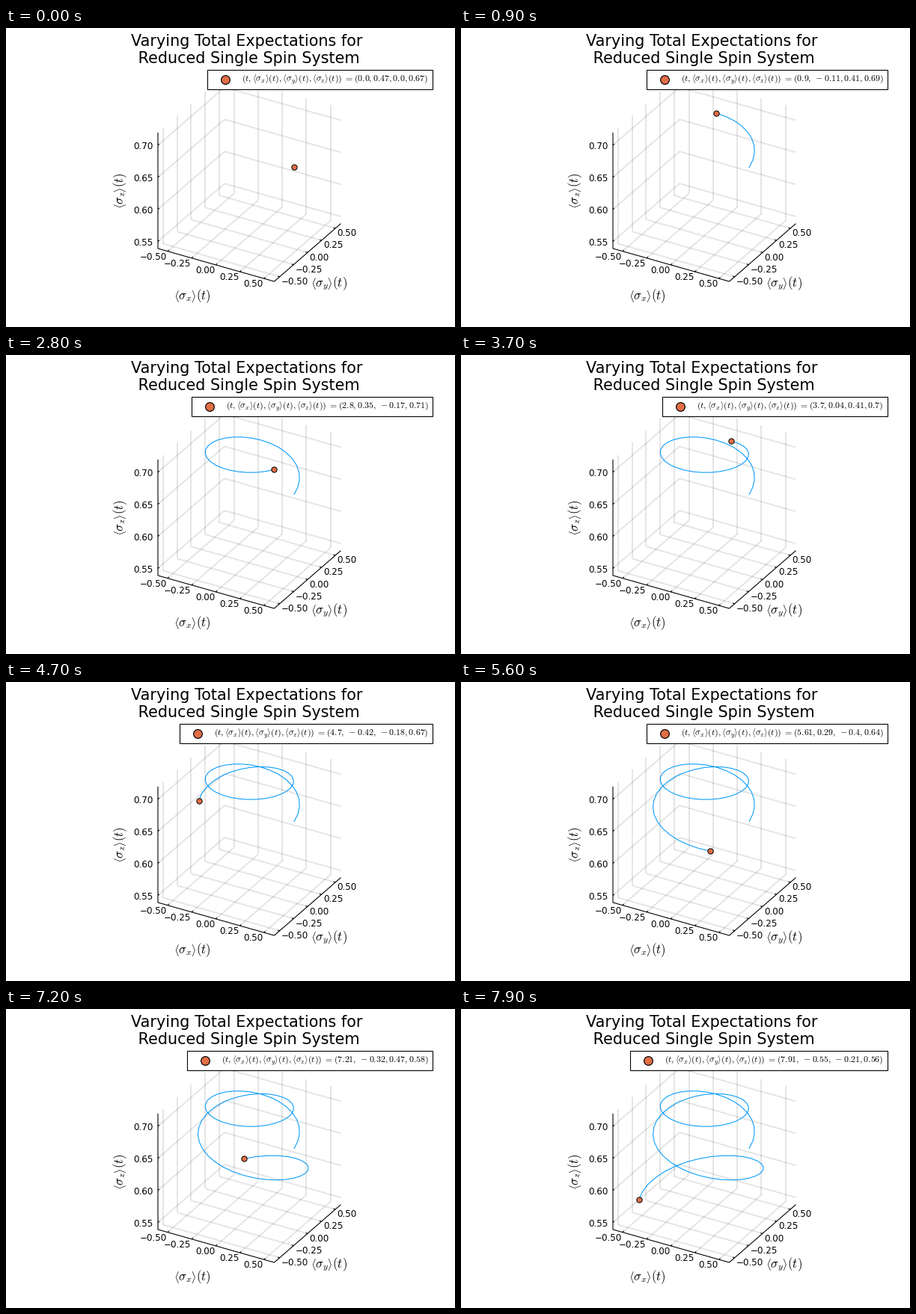
Recreate the animation shown at these times as a matplotlib script. Size 600x400 px, loop 8000 ms.

```python
import matplotlib.pyplot as plt
import numpy as np
from matplotlib.animation import FuncAnimation
from matplotlib.patches import Rectangle

plt.rcParams["font.family"] = "DejaVu Sans"
plt.rcParams["mathtext.fontset"] = "cm"

PT = 0.72  # points per pixel at 100 dpi
FRAMES = 80
ORANGE, BLUE = "#E26F46", "#009AFA"

fig = plt.figure(figsize=(6, 4), dpi=100, facecolor="white")
ax = fig.add_axes([0, 0, 1, 1])
ax.set_xlim(0, 600)
ax.set_ylim(400, 0)
ax.axis("off")

# Data limits of the 3D box
X0, X1 = -0.600, 0.607
Y0, Y1 = -0.598, 0.598
Z0, Z1 = 0.5389, 0.7197
XY_TICKS = np.arange(-2, 3) * 0.25
Z_TICKS = np.arange(4) * 0.05 + 0.55


def project(x, y, z):
    """Orthographic view: data to pixels."""
    u, v, w = x - X0, y - Y0, z - Z0
    return 203 + 128.8 * u + 74.4 * v, 295 + 36.5 * u - 64.7 * v - 858 * w


def line3(points, **style):
    px, py = zip(*(project(*p) for p in points))
    ax.plot(px, py, solid_capstyle="butt", **style)


def label(x, y, text, size=11.9, **kw):
    return ax.text(x, y, text, fontsize=size * PT, color="black", **kw)


def num(v):
    return f"{v:.2f}".replace("-", "\u2212")


def draw_box():
    grid = dict(color="black", alpha=0.1, lw=2 * PT, zorder=1)
    edge = dict(color="black", lw=1.1 * PT, zorder=2)
    for s in XY_TICKS:
        line3([(s, Y0, Z0), (s, Y1, Z0)], **grid)
        line3([(s, Y1, Z0), (s, Y1, Z1)], **grid)
        line3([(X0, s, Z0), (X1, s, Z0)], **grid)
        line3([(X0, s, Z0), (X0, s, Z1)], **grid)
        line3([(s, Y0, Z0), (s, Y0 + 0.025, Z0)], **edge)
        line3([(X1, s, Z0), (X1 - 0.02, s, Z0)], **edge)
        px, py = project(s, Y0, Z0)
        label(px - 0.7, py + 11.1, num(s), ha="right")
        px, py = project(X1, s, Z0)
        label(px + 2.2, py + 10.2, num(s), ha="left")
    for s in Z_TICKS:
        line3([(X0, Y0, s), (X0, Y1, s)], **grid)
        line3([(X0, Y1, s), (X1, Y1, s)], **grid)
        line3([(X0, Y0, s), (X0, Y0 + 0.025, s)], **edge)
        px, py = project(X0, Y0, s)
        label(px - 6.5, py + 5.2, num(s), ha="right")
    line3([(X0, Y0, Z1), (X0, Y0, Z0), (X1, Y0, Z0), (X1, Y1, Z0)], **edge)


def sigma(axis):
    # h and i are the text-size angle brackets of the symbol font
    return rf"\mathcal{{h}}\sigma_{axis}\mathcal{{i}}(t)"


draw_box()
label(322, 24, "Varying Total Expectations for", 20.8, ha="center")
label(321.5, 47, " Reduced Single Spin System", 20.8, ha="center")
label(248.5, 363, f"${sigma('x')}$", 16.8, ha="center")
label(431.5, 346, f"${sigma('y')}$", 16.8, ha="center")
label(153, 218, f"${sigma('z')}$", 16.8, ha="center", va="center", rotation=90)


def spin_path(t):
    """Precession about a tilted axis in a rotating frame, fixed length."""
    knots_t = [0, 0.2, 1.1, 1.8, 2.5, 3.3, 4, 4.7, 5.8, 6.5, 7, 7.9]
    knots_z = [0.6655, 0.673, 0.6996, 0.7114, 0.7138, 0.7062,
               0.693, 0.6737, 0.6353, 0.607, 0.5886, 0.5592]
    z = np.polyval(np.polyfit(knots_t, knots_z, 6), t)
    phi = 0.46 * (t - 2.43)
    psi = np.arctan2(0.502 * np.sin(phi), 0.495 * np.cos(phi) - 0.1087)
    wobble = 1.2 * np.sin(2 * np.pi * t / 7.91)
    theta = psi + np.radians(76.9 + 87.77 * t - wobble)
    rho = np.sqrt(0.661 - z * z)
    return rho * np.cos(theta), rho * np.sin(theta), z


times = np.arange(FRAMES) * 100 / 999
xs, ys, zs = spin_path(times)
px, py = project(xs, ys, zs)

curve, = ax.plot([], [], color=BLUE, lw=1.05 * PT, zorder=3)
marker = dict(marker="o", mfc=ORANGE, mec="black", ls="none")
dot, = ax.plot([], [], ms=7.3 * PT, mew=1 * PT, zorder=4, **marker)

# Legend, anchored at its right side
RIGHT, TOP, BOTTOM = 570.2, 55.9, 82
frame_box = Rectangle((0, TOP), 1, BOTTOM - TOP, fc="white", ec="black",
                      lw=1.1 * PT, zorder=5)
ax.add_patch(frame_box)
key, = ax.plot([], [], ms=11.7 * PT, mew=1.2 * PT, zorder=6, **marker)
legend = label(564.3, 72.3, "", ha="right", zorder=6)
HEAD = "(t," + ",".join(sigma(a) for a in "xyz") + r")\ ="


def update(i):
    curve.set_data(px[:i + 1], py[:i + 1])
    dot.set_data([px[i]], [py[i]])
    values = (times[i], xs[i], ys[i], zs[i])
    body = ",".join(str(round(float(v), 2)) for v in values)
    body = body.replace("-", r"\:-")
    legend.set_text(f"${HEAD}({body})$")
    box = legend.get_window_extent().transformed(ax.transData.inverted())
    left = round(min(box.x0, box.x1) - 46) + 0.2
    frame_box.set_x(left)
    frame_box.set_width(RIGHT - left)
    key.set_data([left + 23.4], [69.2])
    return curve, dot, frame_box, key, legend


anim = FuncAnimation(fig, update, frames=FRAMES, interval=100,
                     repeat=True, repeat_delay=0, blit=False)
plt.show()
```
